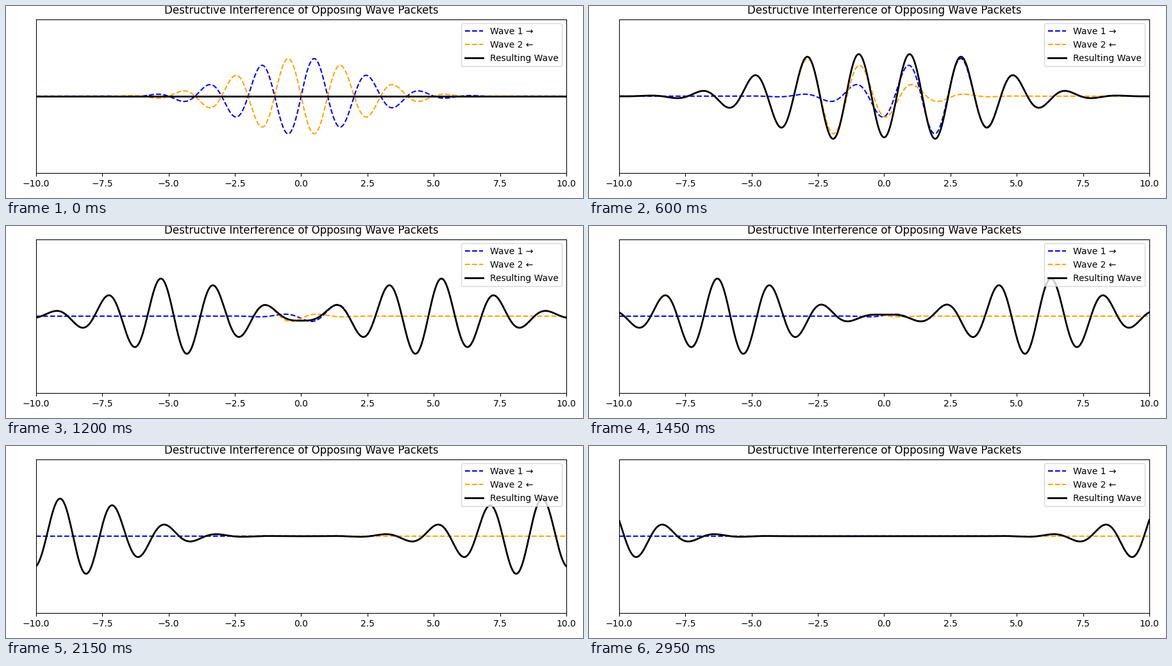
Write a matplotlib script that moves like this. It is 900 by 300 pixels and loops after 3000 ms.

```python
import matplotlib.pyplot as plt
import numpy as np
from matplotlib.animation import FuncAnimation

FRAMES = 60
INTERVAL = 50  # ms
STEP = 0.2     # distance travelled per frame

x = np.linspace(-10, 10, 1000)


def packet(u):
    return np.exp(-0.1 * u**2) * np.sin(np.pi * u)


fig, ax = plt.subplots(figsize=(9, 3), dpi=100)
fig.tight_layout()  # margins fitted to the empty axes
ax.set_xlim(-10, 10)
ax.set_ylim(-2, 2)
ax.set_yticks([])
ax.set_title("Destructive Interference of Opposing Wave Packets")

right, = ax.plot(x, packet(x), "--", color="blue", label="Wave 1 →")
left, = ax.plot(x, -packet(x), "--", color="orange", label="Wave 2 ←")
total, = ax.plot(x, np.zeros_like(x), color="black", lw=2,
                 label="Resulting Wave")
ax.legend(loc="upper right")


def update(i):
    shift = STEP * i
    y1 = packet(x - shift)
    y2 = -packet(x + shift)
    right.set_ydata(y1)
    left.set_ydata(y2)
    total.set_ydata(y1 + y2)
    return right, left, total


anim = FuncAnimation(fig, update, frames=FRAMES, interval=INTERVAL,
                     repeat=True, repeat_delay=0, blit=False)
plt.show()
```
